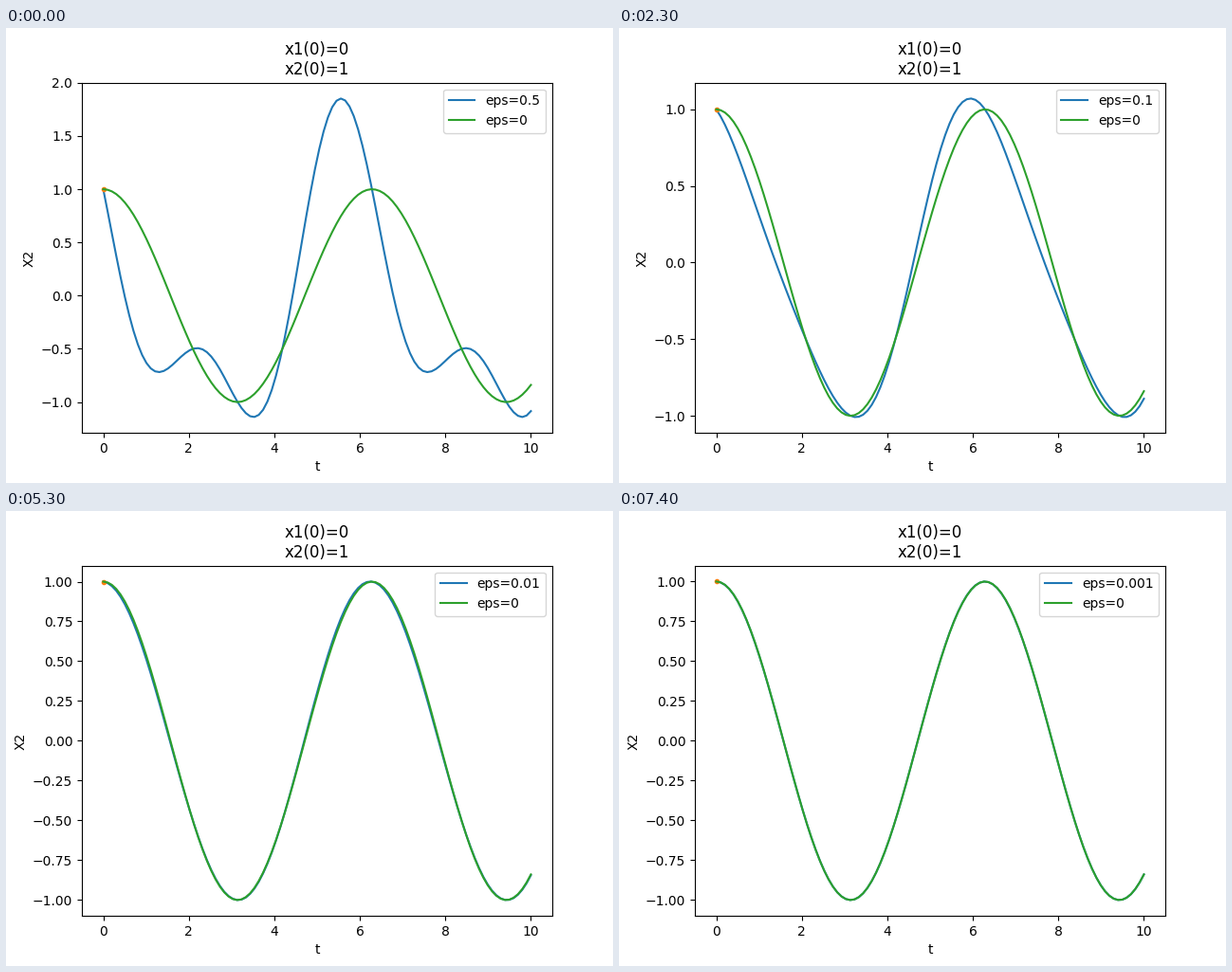
Write a matplotlib script that moves like this. It is 640x480 px and loops after 8000 ms.

```python
import numpy as np
import matplotlib.pyplot as plt
from matplotlib.animation import FuncAnimation

STEP_MS = 500
# (eps, number of steps it stays on screen)
STAGES = [(0.5, 1), (0.1, 6), (0.01, 6), (0.001, 3)]
SCHEDULE = [eps for eps, steps in STAGES for _ in range(steps)]

t = np.linspace(0, 10, 100)
fig, ax = plt.subplots(figsize=(6.4, 4.8), dpi=100)


def solution(eps):
    """First-order perturbed oscillator."""
    return np.cos(t) - 4 / 3 * eps * (np.sin(t) + np.sin(2 * t))


def draw(i):
    eps = SCHEDULE[i]
    ax.clear()
    ax.plot(t, solution(eps), color="C0", label=f"eps={eps}")
    ax.plot(0, 1, ".", color="C1")
    ax.plot(t, solution(0), color="C2", label="eps=0")
    ax.set_title("x1(0)=0\nx2(0)=1")
    ax.set_xlabel("t")
    ax.set_ylabel("X2")
    ax.legend(loc="upper right")
    return ax.lines


anim = FuncAnimation(fig, draw, frames=len(SCHEDULE), init_func=lambda: draw(0),
                     interval=STEP_MS, repeat=True, repeat_delay=0)
plt.show()
```
